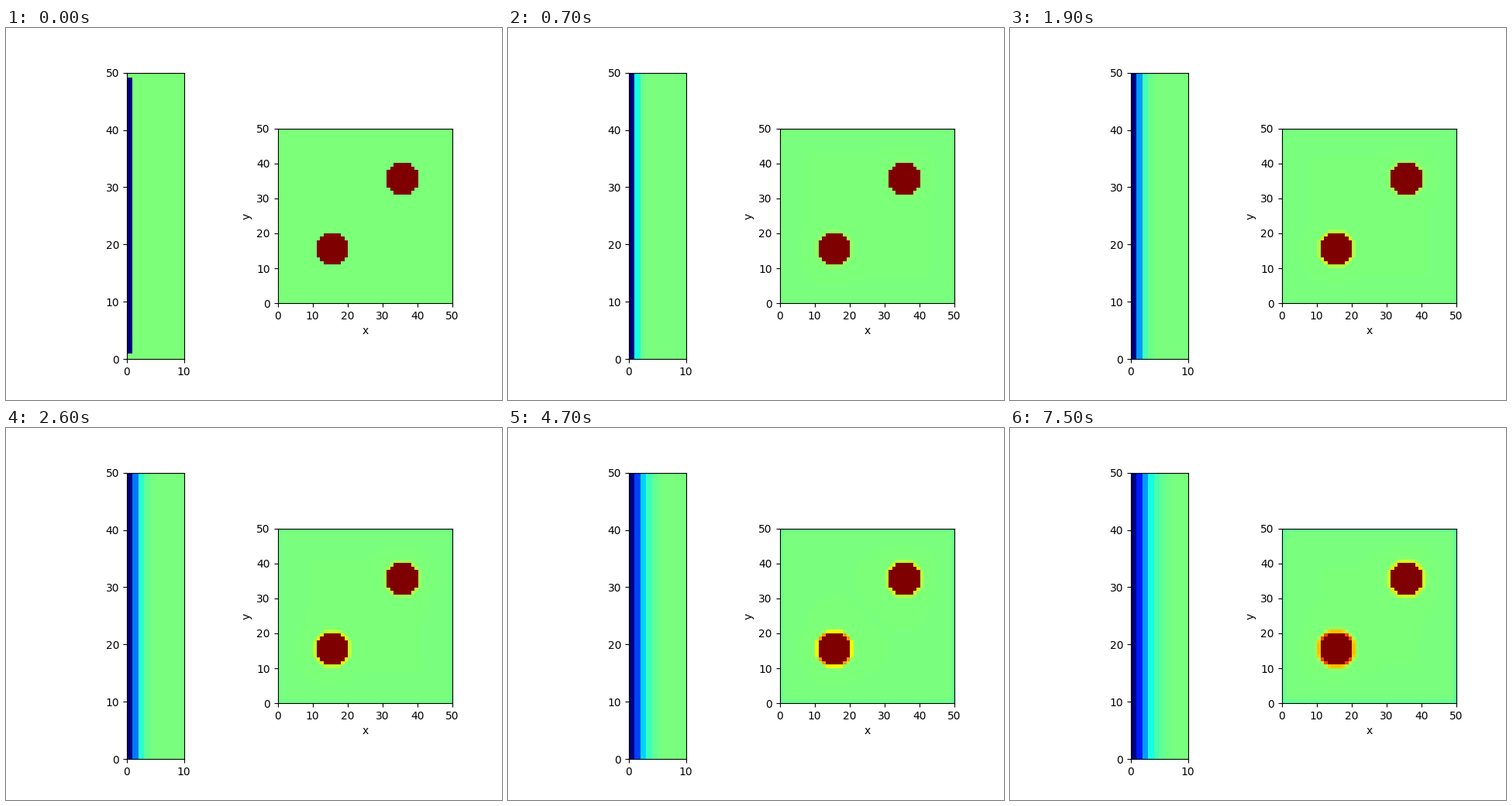
Animation, 640 px wide and 480 px high, one loop 8000 ms. Source, as a matplotlib script:

```python
import numpy as np
import matplotlib.pyplot as plt
from matplotlib.animation import FuncAnimation

FRAMES = 80
SUBSTEPS = 4
WALL_D = 0.045    # diffusion per frame, in cells squared
DISC_D = 0.0035
EDGE = -0.25      # value just outside the square plate

# Frames at which the displayed state is refreshed
REFRESH = [0, 1, 3, 5, 6, 7, 9, 11, 12, 14, 17, 19, 23, 26, 27, 29, 33, 37,
           42, 47, 50, 53, 57, 60, 64, 67, 70, 75]


def laplacian(p):
    return (p[2:, 1:-1] + p[:-2, 1:-1] + p[1:-1, 2:] + p[1:-1, :-2]
            - 4 * p[1:-1, 1:-1])


def wall_states():
    u = np.zeros((50, 10))
    u[1:-1, 0] = -1
    states = [u.copy()]
    for _ in range(FRAMES - 1):
        u[:, 0] = -1
        for _ in range(SUBSTEPS):
            u += WALL_D / SUBSTEPS * laplacian(np.pad(u, 1, mode="edge"))
            u[:, 0] = -1
        states.append(u.copy())
    return states


def disc_states():
    y, x = np.mgrid[:50, :50]
    discs = [((x - c) ** 2 + (y - c) ** 2 < 25, value)
             for c, value in ((15, 2), (35, 1))]
    u = np.zeros((50, 50))

    def hold_discs():
        for mask, value in discs:
            u[mask] = value

    hold_discs()
    states = [u.copy()]
    for _ in range(FRAMES - 1):
        for _ in range(SUBSTEPS):
            u += DISC_D / SUBSTEPS * laplacian(
                np.pad(u, 1, constant_values=EDGE))
            hold_discs()
        states.append(u.copy())
    return states


wall, plate = wall_states(), disc_states()

fig, (ax_wall, ax_plate) = plt.subplots(1, 2, figsize=(6.4, 4.8), dpi=100)


def show(ax, data, width):
    im = ax.imshow(data, cmap="jet", vmin=-1, vmax=1, origin="lower",
                   extent=(0, width, 0, 50), interpolation="nearest")
    ax.set_xticks(range(0, width + 1, 10))
    ax.set_yticks(range(0, 51, 10))
    return im


wall_im = show(ax_wall, wall[0], 10)
plate_im = show(ax_plate, plate[0], 50)
ax_plate.set_xlabel("x")
ax_plate.set_ylabel("y")


def update(frame):
    n = max(k for k in REFRESH if k <= frame)
    wall_im.set_data(wall[n])
    plate_im.set_data(plate[n])
    return wall_im, plate_im


anim = FuncAnimation(fig, update, frames=FRAMES, interval=100, repeat=True,
                     repeat_delay=0)
plt.show()
```
